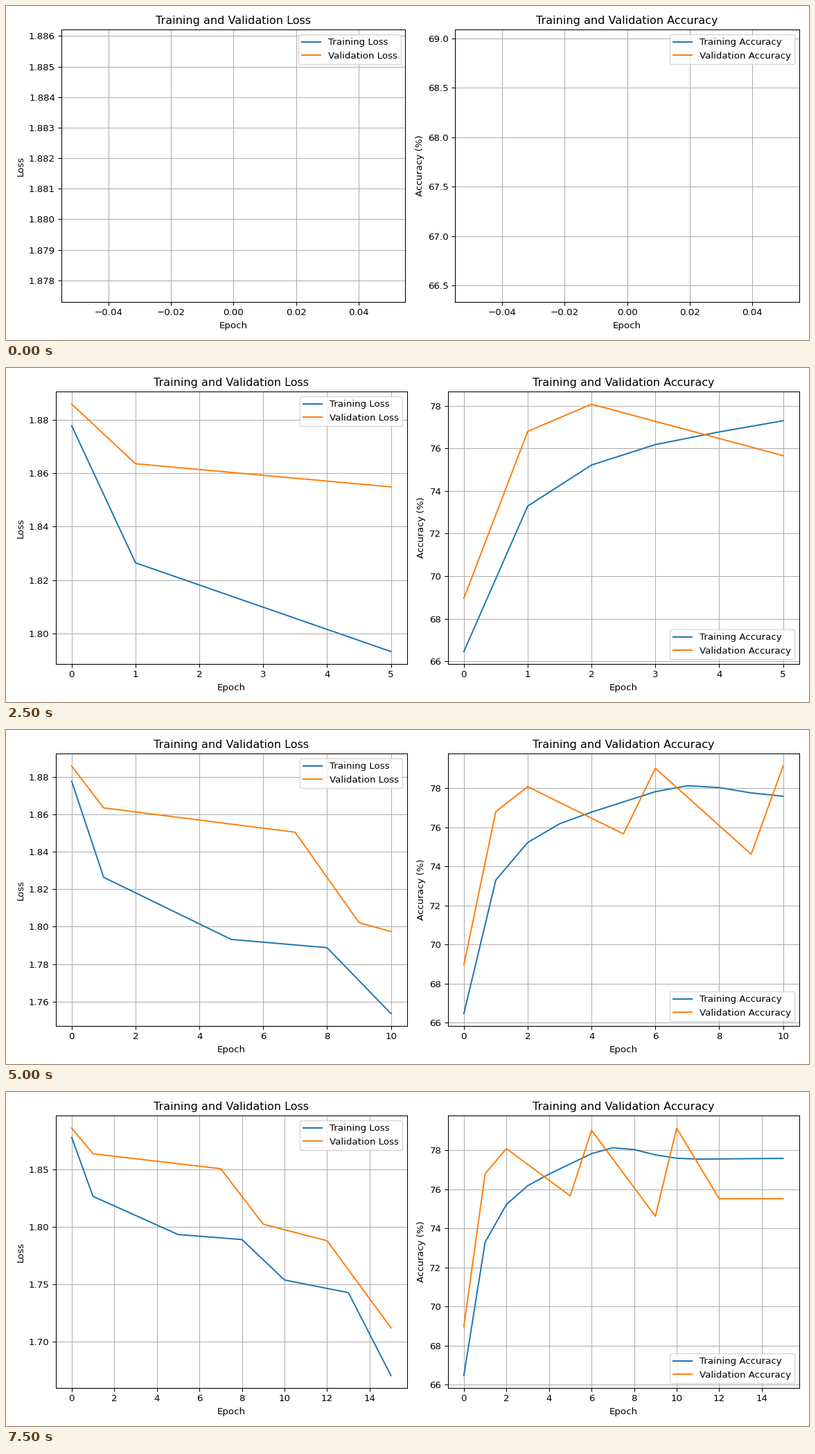
Recreate the animation shown at these times as a matplotlib script. Size 1159 px wide and 483 px high, loop 8000 ms.

```python
import matplotlib.pyplot as plt
import numpy as np
from matplotlib.animation import FuncAnimation

W, H, DPI = 1159, 483, 96
EPOCHS = 16
INTERVAL = 500

epochs = np.arange(EPOCHS)


def curve(*knots):
    """Straight segments through (epoch, value) turning points."""
    return np.interp(epochs, *zip(*knots))


train_loss = curve((0, 1.8777), (1, 1.8264), (5, 1.7932), (8, 1.7888),
                   (10, 1.7536), (13, 1.7426), (15, 1.6704))
val_loss = curve((0, 1.8858), (1, 1.8635), (7, 1.8505), (9, 1.8022),
                 (12, 1.7878), (15, 1.712))

# fast saturation with a soft hump around epoch 7
train_acc = (77.6 - 11.14 * np.exp(-0.95 * epochs ** 0.7)
             + 0.8 * np.exp(-((epochs - 7) / 2) ** 2))
val_acc = curve((0, 68.96), (1, 76.8), (2, 78.08), (5, 75.66),
                (6, 79.02), (9, 74.62), (10, 79.13), (12, 75.52))

plt.rcParams["font.family"] = "DejaVu Sans"
fig, (ax_loss, ax_acc) = plt.subplots(1, 2, figsize=(W / DPI, H / DPI), dpi=DPI)


def plot_metric(ax, name, ylabel, train, val, n):
    ax.clear()
    ax.plot(epochs[:n], train[:n], label=f"Training {name}")
    ax.plot(epochs[:n], val[:n], label=f"Validation {name}")
    ax.set_title(f"Training and Validation {name}")
    ax.set_xlabel("Epoch")
    ax.set_ylabel(ylabel)
    ax.legend(loc="best")
    ax.grid(True)


def update(epoch):
    n = epoch + 1
    # start from the default margins so the layout depends on the epoch alone
    fig.subplots_adjust(left=0.125, right=0.9, bottom=0.11, top=0.88, wspace=0.2)
    plot_metric(ax_loss, "Loss", "Loss", train_loss, val_loss, n)
    plot_metric(ax_acc, "Accuracy", "Accuracy (%)", train_acc, val_acc, n)
    fig.tight_layout()


anim = FuncAnimation(fig, update, frames=EPOCHS, interval=INTERVAL,
                     repeat=True, repeat_delay=0)
plt.show()
```
